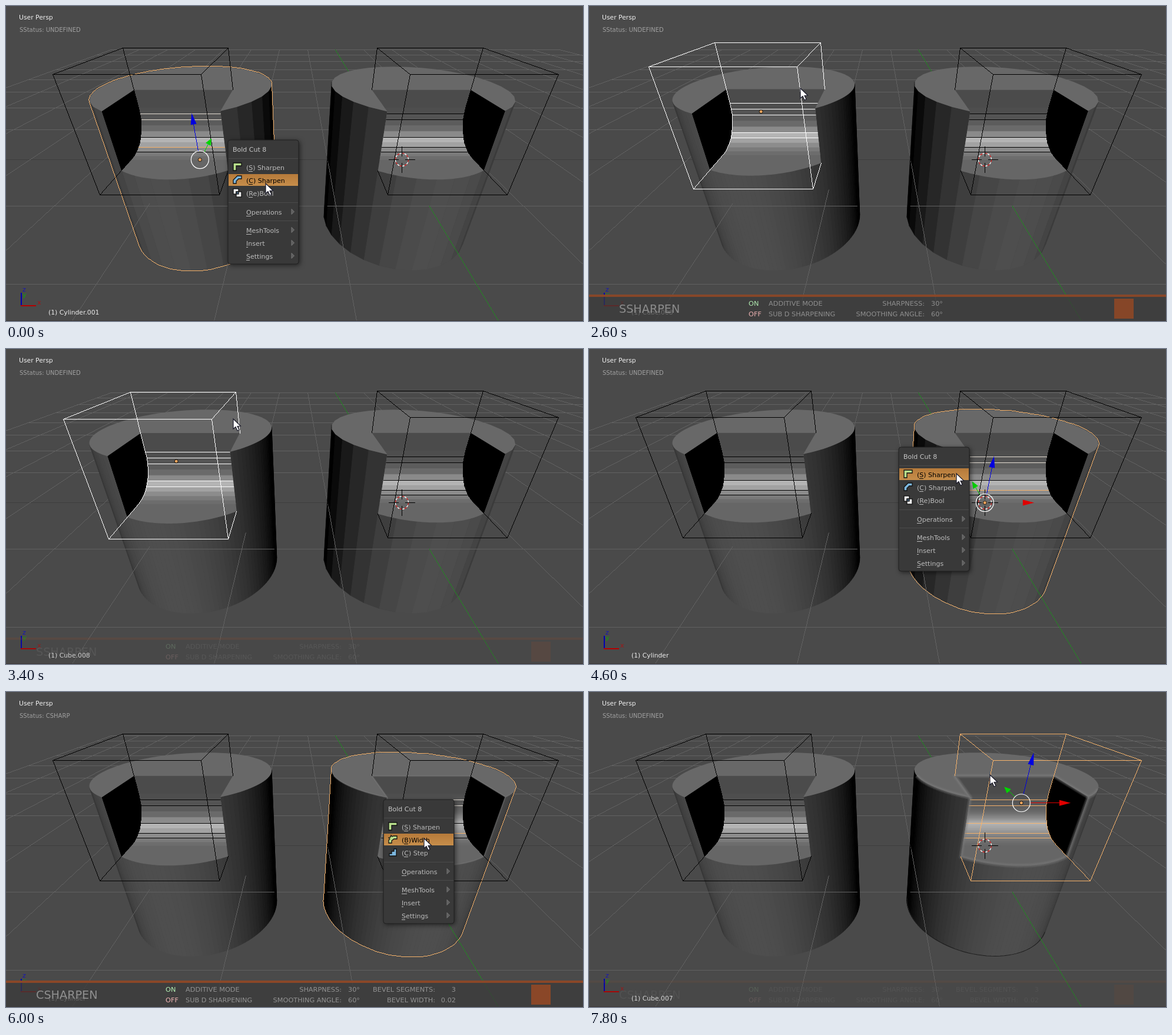
Animation of 980 by 536 pixels, one loop 8 s. Source, as an HTML page with a canvas:

```html
<!DOCTYPE html>
<html>
<head>
<meta charset="utf-8">
<style>
html, body { margin: 0; width: 980px; height: 536px; overflow: hidden; background: #4a4a4a; }
canvas { display: block; }
</style>
</head>
<body>
<canvas id="view" width="980" height="536"></canvas>
<script>
const c = document.getElementById('view').getContext('2d');
const LOOP = 8000, STEP = 200;
const ORANGE = '#f5b26b', FONT = '"DejaVu Sans", Verdana, sans-serif';
const CAM = { x: -1.43, y: -3.64 };
const FILLET = 0.45;
const BANDS = [78, 84, 92, 106, 138, 180, 162, 140, 122, 109, 102];

// ---------- helpers ----------
const project = (x, y, z) => {
  const w = 4.839 + y - 0.583 * z;
  return [491.8 + (873.6 + 611.5 * x) / w, 0.55 + (1456.8 - 40 * (4.839 + y) - 684 * z) / w];
};
const gray = v => { v = Math.round(v); return `rgb(${v},${v},${v})`; };

// keys: [time, value, value...]; linear between, held at the ends
function track(keys, t) {
  if (t <= keys[0][0]) return keys[0].slice(1);
  for (let i = 1; i < keys.length; i++) {
    const a = keys[i - 1], b = keys[i];
    if (t <= b[0]) return a.slice(1).map((v, j) => v + (b[j + 1] - v) * (t - a[0]) / (b[0] - a[0]));
  }
  return keys[keys.length - 1].slice(1);
}
function trace(pts, close) {
  c.beginPath();
  for (const p of pts) c.lineTo(p[0], p[1]);
  if (close) c.closePath();
}
function line(pts, color, width, close) {
  trace(pts, close);
  c.strokeStyle = color;
  c.lineWidth = width;
  c.stroke();
}
// One-pixel line without antialiasing
function thin(pts, color, close) {
  c.fillStyle = color;
  const p = pts.map(q => q.map(Math.floor));
  if (close) p.push(p[0]);
  for (let i = 1; i < p.length; i++) {
    const [x, y] = p[i - 1], dx = p[i][0] - x, dy = p[i][1] - y;
    const n = Math.max(Math.abs(dx), Math.abs(dy)) || 1;
    for (let k = 0; k <= n; k++) c.fillRect(Math.round(x + dx * k / n), Math.round(y + dy * k / n), 1, 1);
  }
}
function fill(pts, color, seam) {
  trace(pts, true);
  c.fillStyle = color;
  c.fill();
  if (seam) { c.strokeStyle = color; c.lineWidth = 0.7; c.stroke(); }
}
function text(s, x, y, color, size = 11, align = 'left') {
  c.font = size + 'px ' + FONT;
  c.textAlign = align;
  c.fillStyle = color;
  c.fillText(s, x, y);
}

// ---------- scene ----------
function grid() {
  for (let i = -2; i <= 8; i++)
    thin([project(-8, i, 0), project(8, i, 0)], i ? '#616161' : '#3d3d3d');
  for (let i = -8; i <= 8; i++)
    thin([project(i, 8, 0), project(i, -3, 0)], i ? '#616161' : '#1f8a1f');
}

// A cylinder of radius 1 and height 2, mirrored in x when m is -1;
// dx, dy shift its cutter across the screen
function makeSolid(cx, m, opts) {
  const s = { dx: 0, dy: 0, ...opts };
  const at = (x, y, z) => project(cx + m * x, y, z);
  const camX = m * (CAM.x - cx), dist = Math.hypot(camX, CAM.y);
  const mid = Math.atan2(CAM.y, camX), half = Math.acos(1 / dist);
  const lift = -s.dy * 0.0045, shift = m * s.dx * 0.00448;
  const l = -0.556 + shift, r = 0.574 + shift;
  const back = -0.143 + 0.504 * lift, low = 0.335 + 0.864 * lift;
  const yl = -Math.sqrt(1 - l * l), yr = -Math.sqrt(1 - r * r);
  const ring = (z, a, b, n = 48) => Array.from({ length: n + 1 }, (_, i) => {
    const q = a + (b - a) * i / n;
    return at(Math.cos(q), Math.sin(q), z);
  });
  const bend = (x, u) => at(x, back - FILLET * (1 - Math.cos(u * Math.PI / 2)),
    low + FILLET * (1 - Math.sin(u * Math.PI / 2)));
  const profile = x => Array.from({ length: 11 }, (_, i) => bend(x, i / 10));
  const a0 = mid - half, a1 = mid + half;
  const silhouette = [...ring(1, a1, a0 + 2 * Math.PI), ...ring(-1, a0, a1)];
  return Object.assign(s, { cx, m, at, dist, mid, a0, a1, silhouette,
    l, r, back, low, yl, yr, al: Math.atan2(yl, l), ar: Math.atan2(yr, r), ring, bend, profile,
    center: [cx + m * (l + r) / 2, back - 0.552, low + 0.555] });
}

function drawSolid(s) {
  const { at, ring, bend, l, r, back, low, yl, yr, al, ar } = s;
  const n = s.smooth ? 128 : 32, step = 2 * Math.PI / n;
  for (let i = 0; i < n; i++) {
    const a = i * step, q = a + step / 2;
    if (s.dist * Math.cos(q - s.mid) <= Math.cos(step / 2)) continue;
    const e = ring(-1, a, a + step, 1), f = ring(1, a, a + step, 1);
    fill([e[0], e[1], f[1], f[0]], gray(78 * Math.max(0, Math.cos(q + 1.4))), true);
  }
  fill(ring(1, 0, 2 * Math.PI, n), '#686868');

  // the cut, seen through its opening
  c.save();
  trace([at(l, back, 1), at(l, yl, 1), ...ring(low, al, ar), at(r, yr, 1), at(r, back, 1)], true);
  c.clip();
  c.fillStyle = gray(102);
  c.fillRect(0, 0, 980, 536);
  fill([at(l, back, 1), at(r, back, 1), bend(r, 0), bend(l, 0)], '#4b4b4b', true);
  const strips = s.bevel ? 50 : 10;
  for (let i = 0; i < strips; i++) {
    const u = i / strips, v = (i + 1) / strips, k = Math.floor(u * 10), g = u * 10 - k;
    fill([bend(l, u), bend(r, u), bend(r, v), bend(l, v)],
      gray(BANDS[k] + (BANDS[k + 1] - BANDS[k]) * (s.bevel ? g : 0)), true);
  }
  for (const [i, color] of s.wires) thin([bend(l, i / 10), bend(r, i / 10)], color);
  fill([at(r, back, 1), ...s.profile(r), at(r, yr, low), at(r, yr, 1)], '#000');
  c.restore();

  if (s.bevel) drawBevel(s);
  if (s.selected) outline(s.silhouette, ORANGE);

  // floor lines that lie in front of the body
  c.save();
  const edge = ring(0, s.a0, s.a1), first = edge[0], last = edge[edge.length - 1];
  trace([...edge, [last[0], 540], [first[0], 540]], true);
  c.clip();
  grid();
  c.restore();
}

// Drawn one pixel outside the shape
function outline(pts, color) {
  const mean = j => pts.reduce((sum, p) => sum + p[j], 0) / pts.length;
  const mx = mean(0), my = mean(1);
  thin(pts.map(([x, y]) => {
    const d = Math.hypot(x - mx, y - my);
    return [x + (x - mx) / d, y + (y - my) / d];
  }), color, true);
}

function drawBevel(s) {
  const { at, ring, l, r, back, low, yl, yr } = s, w = s.bevel;
  c.save();
  trace(s.silhouette, true);
  c.clip();
  c.lineJoin = 'round';
  const rim = [...ring(1, s.a0 + 0.25, s.al), at(l, back, 1), at(r, back, 1), ...ring(1, s.ar, s.a1)];
  const mouth = [at(l, yl, 1), ...ring(low, s.al, s.ar), at(r, yr, 1)];
  for (const [k, a] of [[1.25, 0.18], [0.8, 0.24], [0.35, 0.28]]) {
    line(rim, `rgba(128,128,128,${a})`, w * k);
    line(mouth, `rgba(122,122,122,${a})`, w * k);
  }
  if (w > 3) line(ring(-1, s.a0, s.a1), '#1c1c1c', 2);
  c.restore();
}

function cage(s, color) {
  const { at, l, r, back, low, yl, yr } = s, front = back - 1.105, top = low + 1.122, base = low - 0.01;
  thin([at(l, front, top), at(r, front, top), at(r, back, top), at(l, back, top)], color, true);
  thin([at(l, front, top), at(l, front, base), at(r, front, base), at(r, front, top)], color);
  thin([at(l, back, top), at(l, back, 1)], color);
  thin([at(l, yl, low), at(l, front, base)], color);
  thin([at(r, back, top), ...s.profile(r), at(r, front, base)], color);
}

function dot([x, y]) {
  c.beginPath();
  c.arc(x, y, 3, 0, 7);
  c.fillStyle = '#e9a35c';
  c.fill();
  c.strokeStyle = '#111';
  c.lineWidth = 1;
  c.stroke();
}

function gizmo([x, y, z], redLine) {
  const o = project(x, y, z), s = 0.137 * (4.839 + y - 0.583 * z);
  const arrow = (tip, color, from, stem) => {
    const dx = tip[0] - o[0], dy = tip[1] - o[1], d = Math.hypot(dx, dy), ux = dx / d, uy = dy / d;
    const b = [o[0] + dx * from, o[1] + dy * from];
    if (stem) thin([[o[0] + ux * 15, o[1] + uy * 15], b], color);
    fill([tip, [b[0] - uy * 5, b[1] + ux * 5], [b[0] + uy * 5, b[1] - ux * 5]], color);
  };
  arrow(project(x, y + s, z), '#00d400', 0.72, true);
  arrow(project(x + s, y, z), '#e00000', 0.77, redLine);
  arrow(project(x, y, z + s), '#0000e0', 0.76, true);
  c.beginPath();
  c.arc(o[0], o[1], 15, 0, 7);
  c.strokeStyle = '#fff';
  c.lineWidth = 1.2;
  c.stroke();
  dot(o);
}

function worldCursor() {
  const x = 672.5, y = 261.5;
  for (let i = 0; i < 16; i++) {
    c.beginPath();
    c.arc(x, y, 11, i * Math.PI / 8, (i + 1) * Math.PI / 8);
    c.strokeStyle = i % 2 ? '#fff' : '#e02020';
    c.lineWidth = 1.2;
    c.stroke();
  }
  for (const [u, v] of [[1, 0], [-1, 0], [0, 1], [0, -1]])
    thin([[x + u * 6, y + v * 6], [x + u * 22, y + v * 22]], '#000');
}

// ---------- interface ----------
function labels(status, name) {
  text('User Persp', 22, 23, '#f0f0f0', 10.8);
  text('SStatus: ' + status, 23, 44, '#a0a0a0', 10);
  line([[26, 510], [26, 488]], '#0000b4', 2);
  line([[25, 510], [51, 510]], '#b40000', 2);
  text('z', 28, 486, '#1818b0');
  text('y', 28, 495, '#10a010');
  text('x', 53, 508, '#a01818');
  text('(1) ' + name, 72, 525, '#ececec', 10.8);
  c.fillStyle = '#3b3636';
  c.fillRect(0, 535, 980, 1);
}

function statusBar(alpha, title, bevel) {
  if (alpha <= 0) return;
  c.save();
  c.globalAlpha = alpha;
  c.fillStyle = 'rgba(58,58,58,.76)';
  c.fillRect(0, 494, 980, 42);
  c.fillStyle = '#8a4728';
  c.fillRect(0, 491, 980, 4);
  text(title, 51, 522, '#8f8f8f', 19.2);
  const size = 11.3, dim = '#929292';
  text('ON', 271, 510, '#b4f0b4', size);
  text('OFF', 271, 528, '#f0b4b4', size);
  text('ADDITIVE MODE', 305, 510, dim, size);
  text('SUB D SHARPENING', 305, 528, dim, size);
  text('SHARPNESS:', 570, 510, dim, size, 'right');
  text('SMOOTHING ANGLE:', 570, 528, dim, size, 'right');
  text('30°', 581, 510, dim, size);
  text('60°', 581, 528, dim, size);
  if (bevel) {
    text('BEVEL SEGMENTS:', 729, 510, dim, size, 'right');
    text('BEVEL WIDTH:', 729, 528, dim, size, 'right');
    text('3', 764, 510, dim, size, 'right');
    text('0.02', 764, 528, dim, size, 'right');
  }
  c.fillStyle = '#8a4728';
  c.fillRect(892, 498, 33, 34);
  c.restore();
}

const GREEN = '#b9e08c', BLUE = '#7db8e0';
const ICONS = {
  corner: [GREEN, 'M1 1H15V6H6V14H1Z'],
  round: [BLUE, 'M1 14V8L8 1H15V6H10L6 10V14Z'],
  width: [GREEN, 'M1 14V9L3 7L1 5L4 4L5 1L7 3L9 2H15V7H10L6 10V14Z'],
  steps: [BLUE, 'M2 14V10H6V6H10V2H14V14Z']
};
function icon(name, x, y) {
  c.save();
  c.translate(x, y);
  c.lineWidth = 1.3;
  c.strokeStyle = '#111';
  if (name === 'bool') {
    for (const [p, w, color] of [[1, 9, '#eee'], [6, 9, '#eee'], [6, 4, '#4a6a88']]) {
      c.fillStyle = color;
      c.fillRect(p, p, w, w);
      c.strokeRect(p, p, w, w);
    }
  } else {
    const path = new Path2D(ICONS[name][1]);
    c.fillStyle = ICONS[name][0];
    c.fill(path);
    c.stroke(path);
  }
  c.restore();
}

const COMMON = [['Operations', 0, 122], ['MeshTools', 0, 153], ['Insert', 0, 175], ['Settings', 0, 197]];
const MAIN = [['(S) Sharpen', 1, 46, 'corner'], ['(C) Sharpen', 1, 68, 'round'], ['(Re)Bool', 1, 90, 'bool']];
const BEVEL = [['(S) Sharpen', 1, 46, 'corner'], ['(B)Width', 1, 68, 'width'], ['(C) Step', 1, 90, 'steps']];

function menu(x, y, items, active) {
  c.save();
  c.shadowColor = 'rgba(0,0,0,.6)';
  c.shadowBlur = 8;
  c.shadowOffsetX = c.shadowOffsetY = 2;
  c.beginPath();
  c.roundRect(x, y, 120, 211, 4);
  c.fillStyle = '#393939';
  c.fill();
  c.restore();
  c.strokeStyle = '#202020';
  c.lineWidth = 1;
  c.stroke();
  text('Bold Cut 8', x + 8, y + 20, '#c6c6c6');
  for (const d of [31, 106, 137]) thin([[x + 1, y + d], [x + 118, y + d]], '#4b4b4b');
  [...items, ...COMMON].forEach(([s, key, dy, pic], i) => {
    const on = i === active, cy = y + dy;
    if (on) {
      const g = c.createLinearGradient(0, cy - 10, 0, cy + 11);
      g.addColorStop(0, '#b67a3a');
      g.addColorStop(1, '#c78f4c');
      c.fillStyle = g;
      c.fillRect(x + 1, cy - 10, 118, 20);
    }
    const color = on ? '#000' : '#bcbcbc';
    text(s, x + 31, cy + 5, color);
    const u = x + 31 + c.measureText(s.slice(0, key)).width;
    thin([[u, cy + 7], [u + c.measureText(s[key]).width - 1, cy + 7]], color);
    if (pic) icon(pic, x + 8, cy - 8);
    else {
      const a = [[x + 108, cy - 4.5], [x + 112.5, cy], [x + 108, cy + 4.5]];
      fill(a, '#5c5c5c');
      line(a, '#858585', 0.8, true);
    }
  });
}

function pointer(x, y) {
  const p = [[0, 0], [0, 17], [4, 13.5], [7, 20], [10, 18.5], [7, 12.5], [12.5, 12]];
  const pts = p.map(([u, v]) => [x + u, y + v]);
  fill(pts, '#fff');
  line(pts, '#1a1a2a', 1.2, true);
}

// ---------- timeline ----------
const MOUSE = [[0, 441, 302], [200, 441, 302], [600, 452, 308], [1000, 470, 312], [1400, 504, 318],
  [1800, 462, 304], [2000, 405, 255], [2200, 345, 190], [2400, 333, 168], [2800, 385, 112],
  [3000, 391, 143], [3400, 386, 119], [3600, 400, 125], [4000, 520, 188], [4200, 562, 205],
  [4400, 585, 212], [4600, 624, 212], [4800, 614, 217], [5000, 606, 229], [5400, 606, 229],
  [5800, 690, 247], [6000, 710, 249], [6400, 712, 250], [7000, 765, 250], [7400, 715, 195],
  [7600, 690, 152], [7800, 681, 141]];
const DRAG = [[2400, 0, 0], [2600, 22, -12], [2800, 58, -28], [3000, 66, -10], [3200, 42, -4],
  [3400, 18, 3], [3600, 8, 2]];
const BAR1 = [[200, 0], [600, 0.6], [1000, 1], [2400, 1], [3000, 0.88], [3200, 0.55], [3400, 0.2], [3600, 0]];
const BAR2 = [[5200, 0], [5600, 0.6], [6000, 1], [7000, 1], [7200, 0.9], [7600, 0.4], [7800, 0.14]];
const WIDTH = [[6200, 2.2], [6600, 3], [7200, 6.5]];

function draw(t) {
  const within = (a, b) => t >= a && t < b;
  const grab = within(2600, 3800), sharp = t >= 5400;
  const cubeL = within(2200, 4200), cubeR = t >= 7600;
  const cylL = t < 2200, cylR = within(4200, 7600);
  const [dx, dy] = grab ? track(DRAG, t) : [0, 0];
  const colorL = grab ? '#fff' : cubeL ? ORANGE : '#000';
  const colorR = cubeR ? ORANGE : '#000';

  const plain = [1, 2, 5, 7, 8];
  const wires = (sel, color) => plain.map(i => [i, !sel ? color : i < 3 ? '#e4dcd2' : i === 7 ? ORANGE : '#000']);
  const grabbed = within(2800, 3200) ? [4, 7, 8] : [0, 1, 2, 5, 6];
  const left = makeSolid(-2.714, -1, { dx: dx + 2.8, dy, smooth: t >= 200, selected: cylL,
    wires: grab ? grabbed.map(i => [i, '#fff']) : wires(cylL, colorL) });
  const right = makeSolid(0, 1, { smooth: sharp, selected: cylR,
    bevel: sharp ? track(WIDTH, t)[0] : 0, wires: wires(cylR, colorR) });

  c.fillStyle = '#4a4a4a';
  c.fillRect(0, 0, 980, 536);
  grid();
  drawSolid(left);
  drawSolid(right);
  cage(left, colorL);
  cage(right, colorR);
  worldCursor();

  if (cylL) gizmo([left.cx, 0, 0]);
  else if (grab) dot(project(...left.center));
  else if (cubeL) gizmo(left.center, true);
  else if (cylR) gizmo([0, 0, 0]);
  else gizmo(right.center, true);

  labels(within(5400, 7600) ? 'CSHARP' : 'UNDEFINED',
    cylL ? 'Cylinder.001' : cubeL ? 'Cube.008' : cylR ? 'Cylinder' : 'Cube.007');
  if (t < 4000) statusBar(track(BAR1, t)[0], 'SSHARPEN', false);
  else statusBar(track(BAR2, t)[0], 'CSHARPEN', true);

  if (t < 200) menu(377, 228, MAIN, 1);
  if (within(4400, 5400)) menu(526, 167, MAIN, t < 5000 ? 0 : 1);
  if (within(5800, 6400)) menu(641, 183, BEVEL, 1);
  pointer(...track(MOUSE, t));
}

let shown = -1;
const begin = performance.now();
function tick() {
  const t = Math.floor(((performance.now() - begin) % LOOP) / STEP) * STEP;
  if (t !== shown) draw(shown = t);
  requestAnimationFrame(tick);
}
tick();
</script>
</body>
</html>
```
